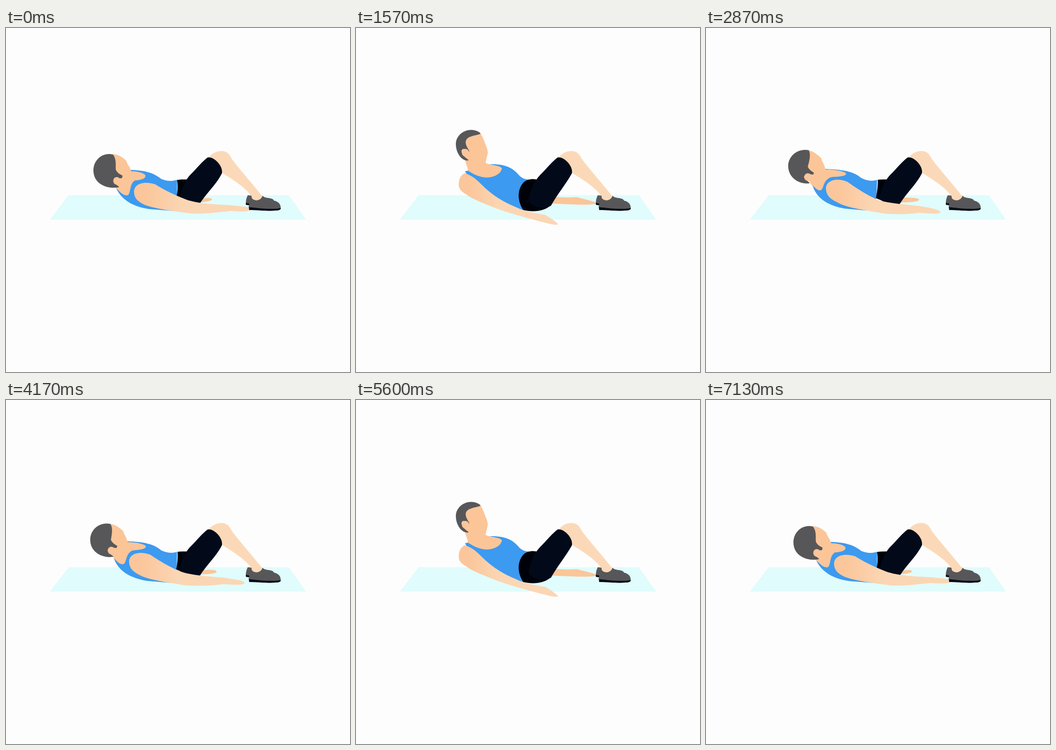
An HTML page without scripts that plays this animation: 720 by 720 pixels, repeating every 8 s.

```html
<!DOCTYPE html>
<html lang="en">
<head>
<meta charset="utf-8">
<title>Heel touch crunch</title>
<style>
html, body { margin: 0; width: 100%; height: 100%; overflow: hidden; background: #fdfdfd; }
svg { display: block; width: 100%; height: 100%; }
.move { animation: 4s linear infinite; }
.skin { fill: #fbc598; }
.pale { fill: #fbd9b8; }
.hair, .shoe { fill: #575759; }
.sole { fill: #080b18; }

/* One cycle: reach near heel, twist to far heel, hold, twist back, hold */
#torso { fill: #3c9af0; animation-name: torso; }
@keyframes torso {
  0%, 77.9%, to { d: path("M358,318 C345,321 338,321 325,316 C308,302 288,298 262,297 C250,310 235,325 230,334 C238,352 255,372 300,379 L352,383 C358,375 358,365 358,354 Z"); }
  7%, 71.75% { d: path("M358,318 C346,321 338,320 325,314 C310,300 285,296 250,295 C240,308 228,320 223,329 C228,348 245,370 290,378 L336,382 C345,375 355,365 357,354 Z"); }
  16.75%, 62.2% { d: path("M362,317 C348,319 340,317 329,311 C318,299 305,294 288,291 C262,294 230,300 217,322 C220,345 240,370 285,377 L322,380 C340,372 352,370 354,362 Z"); }
  29.5%, 50% { d: path("M368,317 C355,318 348,315 341,308 C328,292 312,285 282,285 C262,292 242,297 228,300 C240,320 260,345 300,366 L345,381 C347,382 349,382 350,381 Z"); }
}

#neck { animation-name: neck; }
@keyframes neck {
  0%, 77.9%, to { d: path("M258,300 C270,299 285,302 291,307 C295,314 285,318 270,319 C258,326 262,345 255,350 C245,352 238,342 229,334 L225,310 Z"); }
  7%, 71.75% { d: path("M248,296 C262,296 285,298 293,304 C295,310 280,311 263,312 C245,317 247,335 241,339 C234,342 228,334 222,328 L216,305 Z"); }
  16.75%, 62.2% { d: path("M238,292 C255,291 275,292 289,293 C290,299 283,301 268,299 C248,297 232,302 224,310 C221,313 218,318 217,322 L204,300 Z"); }
  29.5%, 50% { d: path("M270,281 C274,287 309,287 305,296 C300,309 284,313 272,313 C258,312 248,307 240,302 C237,300 235,299 234,298 L234,272 Z"); }
}

#face { animation-name: face; }
@keyframes face {
  0%, 77.9%, to { d: path("M222,264 C236,264 246,272 252,278 L254,284 C258,290 262,296 262,302 C262,312 245,332 232,334 C222,320 210,280 222,264 Z"); }
  7%, 71.75% { d: path("M212,255 C225,258 234,266 241,272 L243,278 C246,284 249,290 250,297 C247,308 235,325 222,330 C212,318 200,275 212,255 Z"); }
  16.75%, 62.2% { d: path("M212,238 C220,243 230,256 236,260 L238,267 C240,274 242,282 241,288 C236,300 222,318 213,315 C200,300 188,250 212,238 Z"); }
  29.5%, 50% { d: path("M258,218 C266,226 270,242 274,251 L276,260 C275,268 272,275 271,283 C260,300 240,300 235,298 C228,272 200,224 258,218 Z"); }
}

#hair { animation-name: hair; }
@keyframes hair {
  0%, 77.9%, to { d: path("M224,265 C232,275 229,288 230,297 C233,303 238,306 244,309 L243,314 C236,315 228,316 226,320 C226,326 235,330 237,333 C218,338 183,330 183,298 C183,274 205,259 224,265 Z"); }
  7%, 71.75% { d: path("M215,256 C220,264 216,280 213,290 C215,296 221,300 226,303 L224,307 C216,305 207,306 205,312 C208,318 216,322 217,325 C196,328 172,314 172,289 C172,266 195,251 215,256 Z"); }
  16.75%, 62.2% { d: path("M212,239 C217,245 206,252 202,259 C196,268 202,276 209,281 L207,291 C203,284 194,284 191,288 C193,296 200,299 204,304 C186,307 167,292 167,268 C167,244 190,231 212,239 Z"); }
  29.5%, 50% { d: path("M256,217 C268,224 254,221 236,229 C225,236 230,246 237,257 L235,262 C230,252 222,250 221,258 C222,268 230,271 236,277 C222,280 209,262 209,243 C209,220 236,206 256,217 Z"); }
}

#ear { animation-name: ear; }
@keyframes ear {
  0%, 77.9%, to { transform: translate(232px, 320px); }
  7%, 71.75% { transform: translate(213px, 312px); }
  16.75%, 62.2% { transform: translate(198px, 291px); }
  29.5%, 50% { transform: translate(229px, 261px); }
}

#arm { fill: url(#tan); animation-name: arm; }
@keyframes arm {
  0%, 77.9%, to { d: path("M268,343 C268,325 290,320 312,327 C330,338 345,346 372,357 C395,367 430,369 470,371 C490,373 512,374 513,378 C512,386 490,384 470,383 C440,386 410,390 385,388 C350,383 310,378 290,370 C275,363 268,355 268,343 Z"); }
  7%, 71.75% { d: path("M251,335 C252,318 275,313 296,322 C315,335 330,346 360,360 C385,368 420,369 450,373 C470,377 490,380 491,386 C485,391 460,387 445,387 C415,391 380,390 365,387 C330,381 290,375 275,365 C260,358 251,350 251,335 Z"); }
  16.75%, 62.2% { d: path("M230,333 C231,312 250,304 272,307 C290,318 292,342 354,363 C375,371 400,376 425,377 C440,382 455,386 458,391 C452,396 435,393 420,391 C390,387 360,387 322,380 C290,373 262,366 250,358 C238,352 231,345 230,333 Z"); }
  29.5%, 50% { d: path("M215,328 C215,315 220,307 228,304 C266,316 262,348 350,381 C365,386 382,389 396,391 C408,398 421,407 423,411 C415,414 400,408 385,405 C360,398 330,390 300,380 C270,368 243,358 232,349 C220,342 215,337 215,328 Z"); }
}

#far-arm { animation-name: far-arm; }
@keyframes far-arm {
  0%, 77.9%, to { d: path("M375,345 C395,352 405,358 412,357 C422,355 431,355 431,359 C429,363 415,365 400,364 Z"); }
  16.75%, 62.2% { d: path("M375,350 C395,348 420,350 440,352 C455,356 468,358 470,361 C465,367 440,365 400,367 Z"); }
  29.5%, 50% { d: path("M375,350 C400,350 425,357 462,354 C485,360 503,364 505,367 C495,372 450,369 400,367 Z"); }
}

#hip { fill: #00020a; animation-name: hip; }
@keyframes hip {
  0%, 77.9%, to { d: path("M378,317 C370,317 365,317 358,318 C360,332 359,345 357,352 C365,356 380,362 400,364 Z"); }
  16.75%, 62.2% { d: path("M378,317 C370,317 367,317 362,317 C360,335 355,350 354,362 C365,367 385,375 400,376 Z"); }
  29.5%, 50% { d: path("M378,317 C366,315 357,318 352,322 C338,335 336,360 350,381 C370,386 395,384 409,370 Z"); }
}

#thigh { fill: #020a1a; animation-name: thigh; }
@keyframes thigh {
  0%, 77.9%, to { d: path("M422,271 C434,268 455,288 452,304 C440,328 420,345 406,367 C390,366 372,362 364,357 C364,350 372,322 385,308 C400,293 412,278 422,271 Z"); }
  16.75%, 62.2% { d: path("M422,271 C434,268 455,288 452,304 C440,328 416,348 402,375 C385,376 370,370 360,358 C363,346 371,322 385,308 C400,293 412,278 422,271 Z"); }
  29.5%, 50% { d: path("M422,271 C434,268 455,288 452,304 C438,329 424,344 408,372 C390,380 368,374 361,362 C364,345 371,322 385,308 C400,293 412,278 422,271 Z"); }
}
</style>
</head>
<body>
<svg viewBox="0 0 720 720">
  <defs>
    <linearGradient id="tan">
      <stop offset=".1" stop-color="#fbc69b"/>
      <stop offset=".42" stop-color="#fbd6b4"/>
    </linearGradient>
  </defs>
  <path fill="#e0fcfc" d="M131,350 H592 L628,401 H92 Z"/>

  <path id="far-arm" class="move skin"/>
  <path class="shoe" d="M506,350 C502,358 502,364 502,369 L512,371 L562,364 C560,354 550,358 538,353 Z"/>
  <path class="sole" d="M502,366 L512,368 V372 L502,370 Z"/>
  <path class="pale" d="M424,272 C432,260 445,256 456,258 C466,260 469,268 474,276 C490,297 515,325 537,353 L534,364 H515 L514,352 C500,333 476,318 452,303 Z"/>

  <path id="torso" class="move"/>
  <path id="hip" class="move"/>
  <path id="thigh" class="move"/>
  <path id="neck" class="move skin"/>
  <path id="face" class="move skin"/>
  <path id="hair" class="move hair"/>
  <ellipse id="ear" class="move skin" rx="7.5" ry="8"/>
  <path id="arm" class="move"/>

  <path class="sole" d="M508,373 L575,376 C576,380 572,382 564,382 C546,384 530,381 509,381 Z"/>
  <path class="shoe" d="M513,353 C516,363 533,364 537,351 C544,358 552,360 564,362 C572,365 575,370 575,377 C556,380 535,378 509,375 C508,367 510,360 513,353 Z"/>
</svg>
</body>
</html>
```
